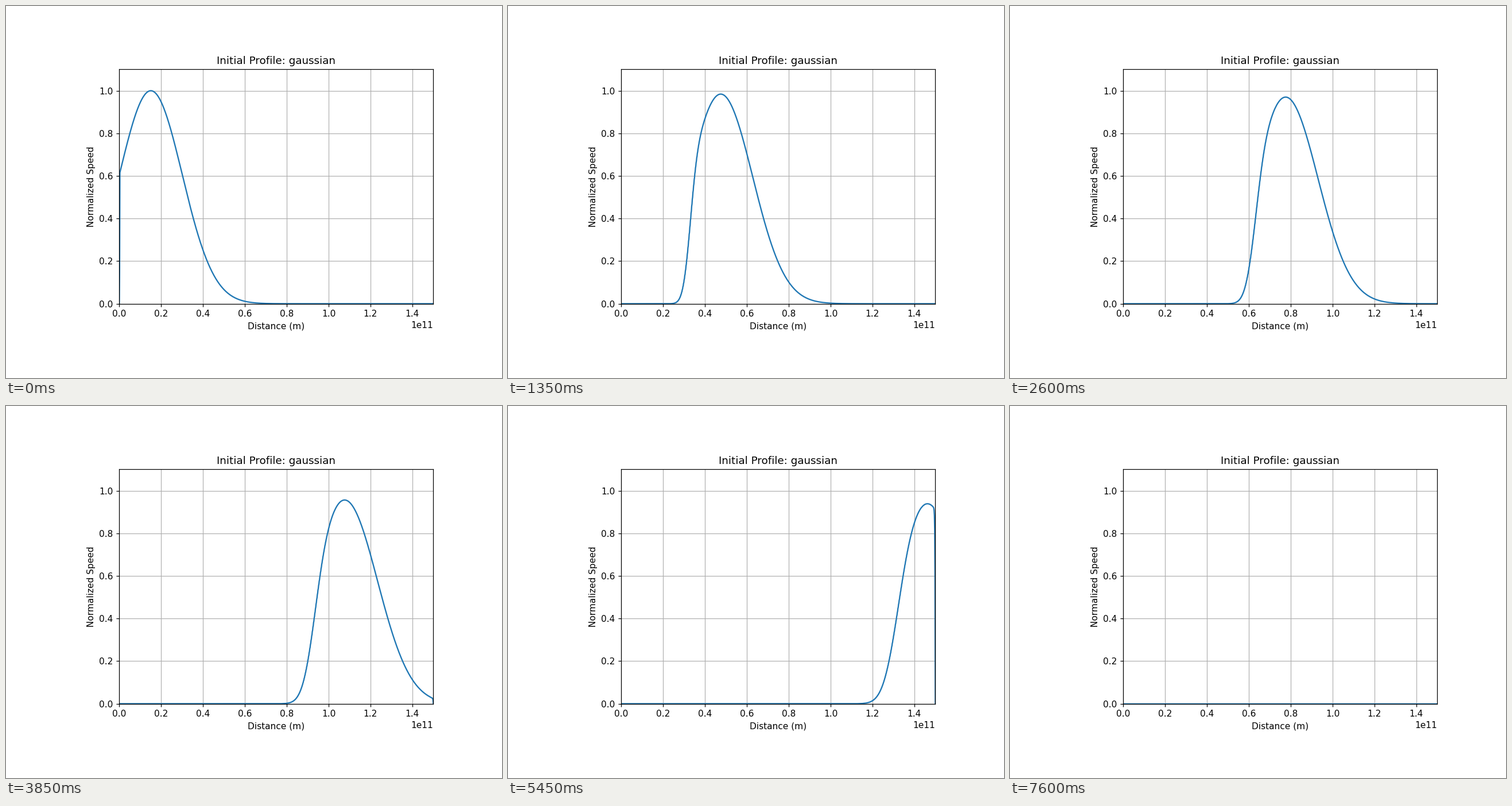
A matplotlib script for the animation above (9.4 s loop, 864 by 648 pixels).

```python
import numpy as np
import matplotlib.pyplot as plt
from matplotlib.animation import FuncAnimation

W, H = 864, 648
DPI = 110.592
FRAMES = 188
INTERVAL = 50
FLAT_FROM = 152  # the pulse has fully left the domain

LENGTH = 1.5e11
N = 1000
COURANT = 0.5
STEPS_PER_FRAME = 16


def initial_profile(x):
    u = np.exp(-0.5 * ((x - 0.1 * LENGTH) / (0.1 * LENGTH)) ** 2)
    u[0] = u[-1] = 0
    return u


def advance(u):
    """One Lax-Friedrichs advection step with fixed zero ends."""
    new = np.zeros_like(u)
    new[1:-1] = 0.5 * ((1 + COURANT) * u[:-2] + (1 - COURANT) * u[2:])
    return new


def simulate(u):
    history = []
    for step in range(FLAT_FROM * STEPS_PER_FRAME + 1):
        u = advance(u)
        if step % STEPS_PER_FRAME == 0:
            history.append(u)
    return history


x = np.linspace(0, LENGTH, N)
history = simulate(initial_profile(x))

fig = plt.figure(figsize=(W / DPI, H / DPI), dpi=DPI, facecolor="white")
ax = fig.add_axes([197.3 / W, 129.4 / H, 547.1 / W, 408.15 / H])
ax.set_xlim(0, LENGTH)
ax.set_ylim(0, 1.1)
ax.set_title("Initial Profile: gaussian")
ax.set_xlabel("Distance (m)")
ax.set_ylabel("Normalized Speed")
ax.grid(True)
line, = ax.plot(x, history[0], color="C0")


def update(frame):
    line.set_ydata(history[min(frame, FLAT_FROM)])
    line.set_snap(frame >= FLAT_FROM)
    return line,


anim = FuncAnimation(fig, update, frames=FRAMES, interval=INTERVAL,
                     repeat=True, repeat_delay=0, blit=False)
plt.show()
```
